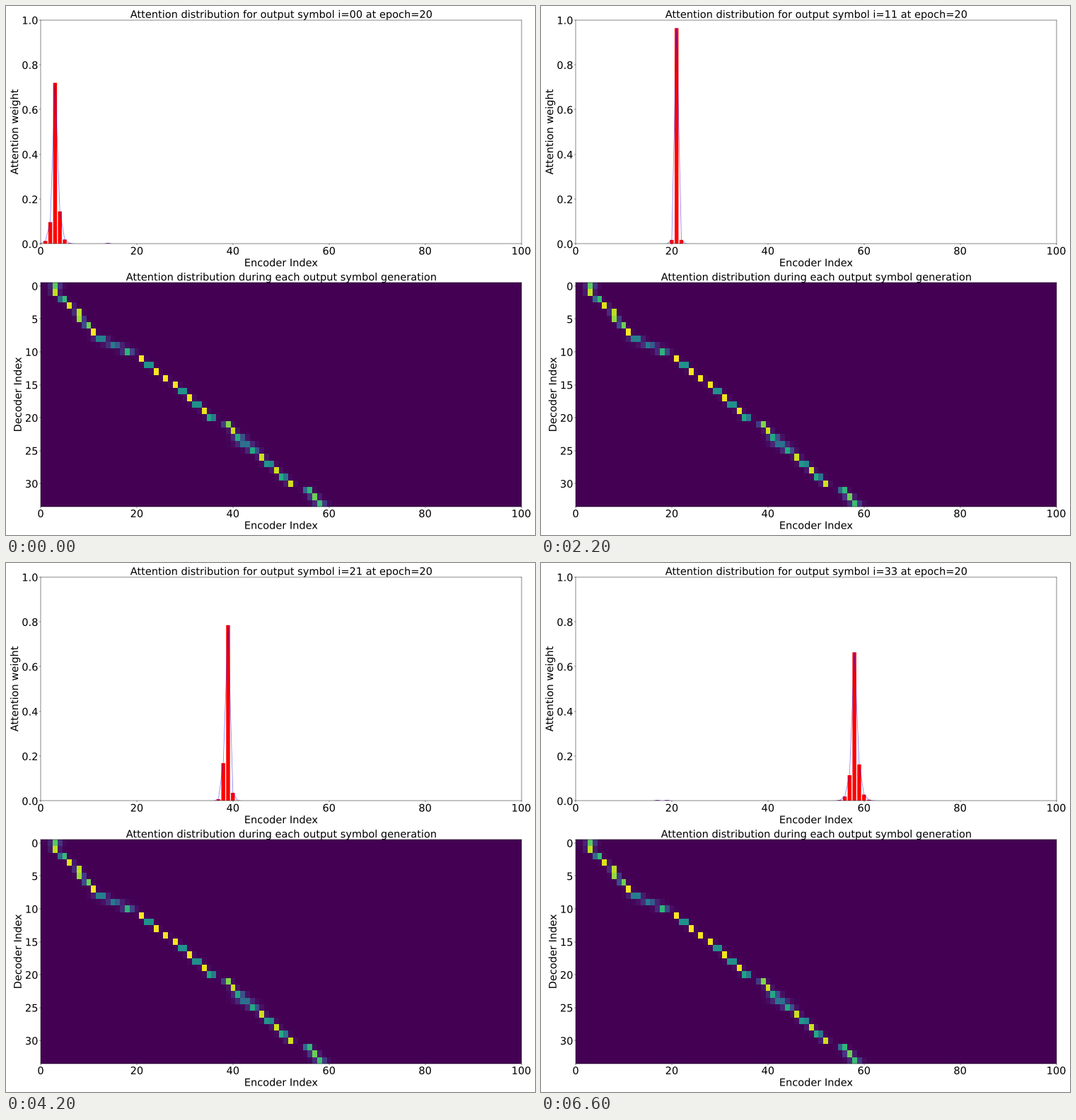
A matplotlib script that plays this animation: 748 px wide and 748 px high, repeating every 6.8 s.

```python
import numpy as np
import matplotlib.pyplot as plt
from matplotlib.animation import FuncAnimation
from matplotlib.patheffects import Normal

SIZE = 748          # stage side in pixels
DPI = 100
PT = 0.374          # scale of a 20 inch layout down to the stage
STEPS, COLS = 34, 101

# Key points of the attended position: (output symbol, encoder index).
PATH = [(0, 3.1), (1, 3), (4, 7.75), (5, 8.3), (7, 11), (8, 12.5), (11, 21),
        (13, 24), (15, 28), (19, 34), (20, 35.45), (21, 38.75), (24, 42.5),
        (26, 46), (30, 51.9), (31, 55.6), (33, 58.1)]

# Key points of the blur around it: (output symbol, decay length).
BLUR = [(0, .5), (2, .25), (7, .25), (9, .9), (11, .25), (20, .3),
        (22, .35), (24, .8), (26, .35), (31, .3), (33, .57)]


def attention():
    """Each row decays exponentially on both sides of the attended position."""
    rows, cols = np.arange(STEPS)[:, None], np.arange(COLS)
    center = np.interp(rows, *zip(*PATH))
    blur = np.interp(rows, *zip(*BLUR))
    grid = np.exp(-abs(cols - center) / blur)
    grid /= grid.sum(axis=1, keepdims=True)
    traces = np.random.default_rng(4).random(grid.shape) > .98
    return np.maximum(grid, .003 * (traces & (cols < 60)))


def add_axes(fig, top, ylabel):
    left, right, height = 49, 728.5, 316.5
    ax = fig.add_axes([left / SIZE, 1 - (top + height) / SIZE,
                       (right - left) / SIZE, height / SIZE])
    ax.set_xlabel("Encoder Index", labelpad=4 * PT)
    ax.set_ylabel(ylabel, labelpad=4 * PT)
    ax.tick_params(length=3.5 * PT, width=.8 * PT, pad=3.5 * PT)
    for spine in ax.spines.values():
        spine.set_linewidth(.9 * PT)
    return ax


plt.rcParams.update({
    "font.family": "DejaVu Sans",
    "font.size": 28 * PT,
    "axes.titlesize": 28 * PT,
    "axes.labelsize": 28 * PT,
    "axes.titlepad": 6 * PT,
    "text.hinting": "none",
})

weights = attention()
index = np.arange(COLS)

fig = plt.figure(figsize=(SIZE / DPI, SIZE / DPI), dpi=DPI, facecolor="white")

top = add_axes(fig, 19.9, "Attention weight")
bars = top.bar(index, weights[0], width=.8, color="red", snap=False)
line, = top.plot(index, weights[0], color="blue", alpha=.5, lw=1.5 * PT)
top.set(xlim=(0, 100), ylim=(0, 1), xticks=range(0, 101, 20),
        yticks=np.linspace(0, 1, 6))
title = top.set_title("")

low = add_axes(fig, 391.3, "Decoder Index")
low.imshow(weights, cmap="viridis", aspect="auto", interpolation="nearest")
low.set(xlim=(0, 100), xticks=range(0, 101, 20), yticks=range(0, 31, 5))
low.set_title("Attention distribution during each output symbol generation")

# Drawing text as outlines keeps its position exact below one pixel.
for text in fig.findobj(plt.Text):
    text.set_path_effects([Normal()])


def update(i):
    for bar, height in zip(bars, weights[i]):
        bar.set_height(height)
    line.set_ydata(weights[i])
    title.set_text(
        f"Attention distribution for output symbol i={i:02d} at epoch=20")
    return [*bars, line, title]


anim = FuncAnimation(fig, update, frames=STEPS, interval=200,
                     repeat=True, repeat_delay=0, blit=False)
plt.show()
```
